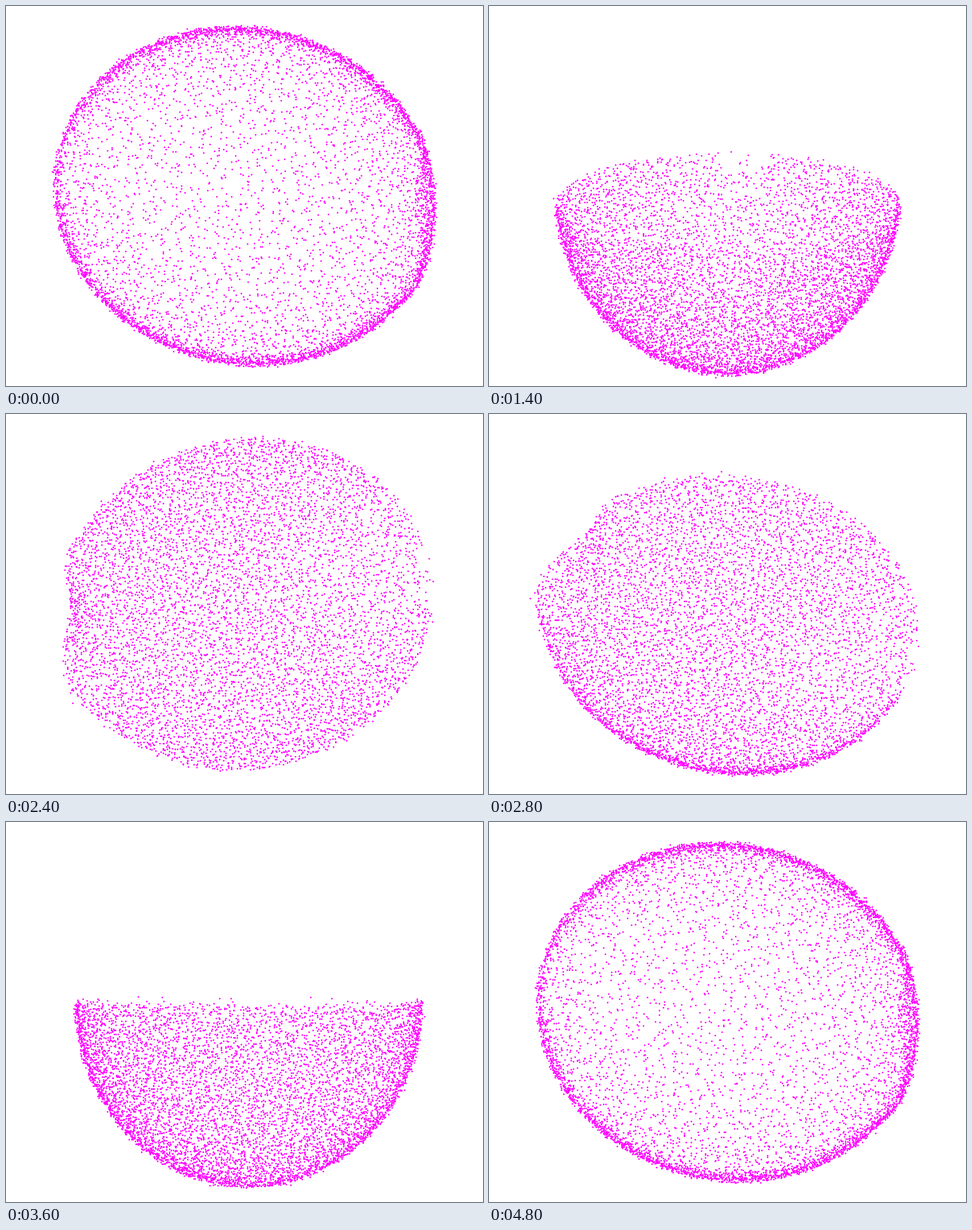
Animation of 838 by 668 pixels, one loop 5 s. Source, as a matplotlib script:

```python
import numpy as np
import matplotlib.pyplot as plt
from matplotlib.animation import FuncAnimation

WIDTH, HEIGHT, DPI = 838, 668, 100
FRAMES, INTERVAL = 25, 200
STEP = 15                      # degrees of orbit per frame
CENTER = (420, 334)
CAMERA = 1000                  # distance from the orbit centre
COUNT = 7800
LONG, SHORT, DEPTH = 326, 285, 306
LONG_AXIS = np.radians(103)
RIM = 16                       # rim height above the orbit centre


def bump(angle, middle, width):
    """Smooth bump around an angle, both in degrees."""
    offset = (angle - middle + 180) % 360 - 180
    return np.exp(-(offset / width) ** 2)


def make_bowl(rng):
    """Scattered points on an uneven half ellipsoid, opening upwards."""
    spread = 0.6 * np.sqrt(2 * np.pi / COUNT)
    index = np.arange(COUNT) + 0.5
    z = -index / COUNT
    lon = index * np.pi * (3 - np.sqrt(5))
    flat = np.sqrt(1 - z ** 2)
    direction = np.stack([flat * np.cos(lon), flat * np.sin(lon), z])
    direction += rng.normal(0, spread, direction.shape)
    direction /= np.linalg.norm(direction, axis=0)
    x, y, z = direction
    z = np.where(z > 0.015, -z, z)

    rough = 1 + rng.normal(0, 0.007, COUNT)
    x, y, z = x * rough * LONG, y * rough * SHORT, z * rough * DEPTH

    angle = np.arctan2(y, x) + LONG_AXIS
    degrees = np.degrees(angle)
    near_rim = np.exp(-(z / 75) ** 2)
    flange = (0.045 * bump(degrees, 117, 10) - 0.06 * bump(degrees, 92, 11)
              + 0.02 * bump(degrees, 73, 8))
    ring = np.hypot(x, y) * (1 + near_rim * flange)

    # One side of the wall is thinly covered and has a gap at the rim.
    thin = 0.5 * bump(degrees, 284, 38) * np.clip(1.3 + z / DEPTH, 0, 1)
    gap = (bump(degrees, 280, 9) > 0.4) & (z > -42)
    keep = rng.random(COUNT) > np.where(gap, 0.85, thin)
    return ring[keep], angle[keep], z[keep] + RIM


ring, angle, height = make_bowl(np.random.default_rng(4))


def project(frame):
    """Perspective view: the camera circles while it climbs from straight
    below to straight above and back down."""
    k = frame % 24
    elev = np.radians(90 - STEP * abs(k - 12))
    if k < 6 or k > 18:
        elev = -np.radians(STEP * abs(k - 12) - 90)
    turned = angle - np.radians(k * STEP)
    side, near = ring * np.sin(turned), ring * np.cos(turned)
    up = height * np.cos(elev) - near * np.sin(elev)
    toward = near * np.cos(elev) + height * np.sin(elev)
    scale = CAMERA / (CAMERA - toward)
    return CENTER[0] + side * scale, CENTER[1] - up * scale


fig = plt.figure(figsize=(WIDTH / DPI, HEIGHT / DPI), dpi=DPI, facecolor="white")
ax = fig.add_axes([0, 0, 1, 1])
ax.set(xlim=(0, WIDTH), ylim=(HEIGHT, 0))
ax.axis("off")
dots, = ax.plot([], [], "o", color="#ff00ff", ms=2.8 * 72 / DPI, mew=0)


def update(frame):
    dots.set_data(*project(frame))
    return dots,


animation = FuncAnimation(fig, update, frames=FRAMES, interval=INTERVAL,
                          repeat=True, repeat_delay=0)
plt.show()
```
